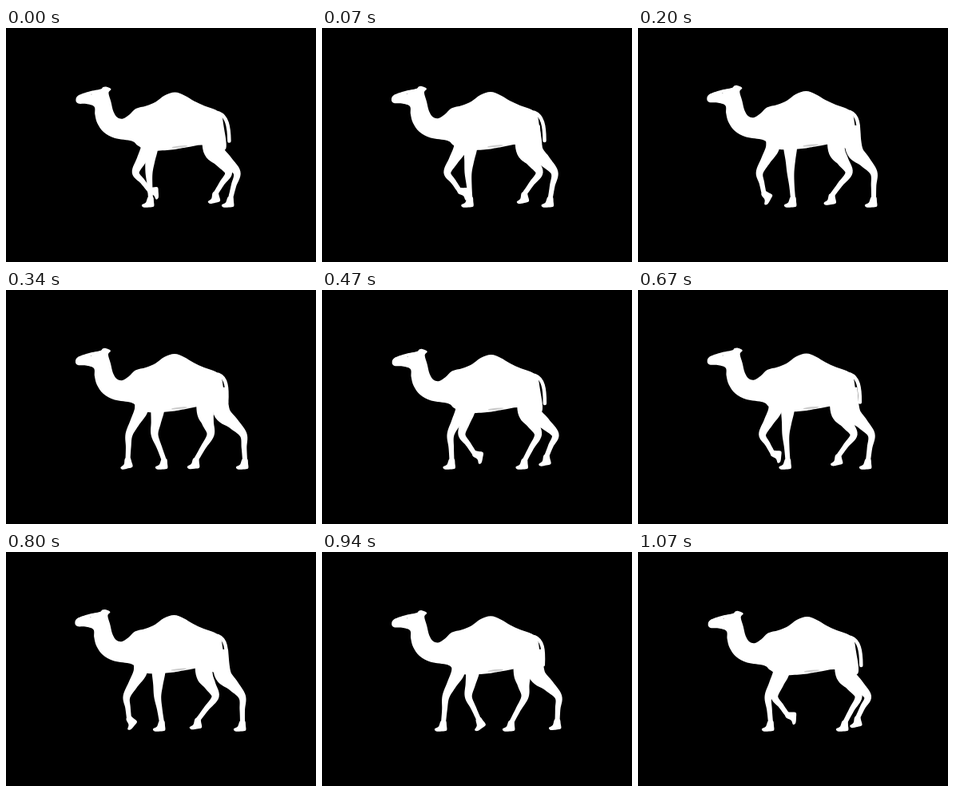
An HTML page with a canvas that plays this animation: 388x293 px, repeating every 1.14 s.

```html
<!DOCTYPE html>
<html lang="en">
<head>
<meta charset="utf-8">
<title>Walking camel</title>
<style>
  html, body { margin: 0; width: 100%; height: 100%; overflow: hidden; background: #000; }
  canvas { display: block; }
</style>
</head>
<body>
<canvas id="stage" width="388" height="293"></canvas>
<script>
const ctx = document.getElementById('stage').getContext('2d');
const LOOP = 1140, STEPS = 17, TURN = 2 * Math.PI;
const LIFT_OFF = 5, TOUCH_DOWN = 14, KNEE_Y = 181, GROUND = 213.5;

// Torso, neck and head, clockwise from the muzzle.
const TORSO = [
  [87, 90], [90, 84], [104, 79], [118, 76], [121, 73.5], [125, 73], [131, 76], [128, 81],
  [131, 92], [134, 104], [139, 111.5], [146, 113], [154, 108], [162, 100.5], [175, 97],
  [187, 92], [198, 84], [211, 80], [223, 84], [235, 91], [248, 97], [262, 102], [269, 108],
  [272, 122], [275, 150], [262, 152], [246, 146], [225, 149], [206, 152], [178, 153],
  [165, 147], [157, 141], [136, 137.5], [122, 130], [114, 119], [111, 108], [110, 98],
  [100, 94.5], [90, 94]
];
const FOOT = [[-3, -2], [3, -2], [4, 4], [4, 10], [-2, 11], [-9, 11], [-11, 8], [-6, 5]];

// Each gait serves both legs of a pair, half a loop apart.
// Its path holds phase, knee x and fetlock x.
const FRONT = {
  hip: 179.5, hipY: 150, lift: 10, tilt: 90, top: [136, 0, 8.5], widths: [8.5, 6.2, 4.5],
  path: [[0, 179, 181], [3, 191, 194], [5, 186, 198], [7, 175, 191],
         [9, 158, 176], [12, 151, 154], [14, 155, 152], [16, 163, 166]]
};
const HIND = {
  hip: 259.5, hipY: 152, lift: 6, tilt: 10, top: [122, -2, 9], widths: [10.5, 7.4, 4.6],
  path: [[0, 289, 281], [3, 295, 295], [5, 297, 299], [7, 292, 281],
         [9, 274, 256], [12, 262, 240], [14, 254, 237], [16, 276, 259]]
};

const lerp = (a, b, u) => a + (b - a) * u;

// Values of a looping path at a phase.
function sample(path, phase) {
  const i = path.findLastIndex(key => key[0] <= phase);
  const from = path[i], to = path[(i + 1) % path.length];
  const span = (to[0] - from[0] + STEPS) % STEPS;
  const u = (phase - from[0]) / span;
  return from.slice(1).map((v, k) => lerp(v, to[k + 1], u));
}

function fillSmooth(points) {
  const n = points.length, at = i => points[(i + n) % n];
  ctx.beginPath();
  ctx.moveTo(...at(0));
  for (let i = 0; i < n; i++) {
    const [a, b, c, d] = [at(i - 1), at(i), at(i + 1), at(i + 2)];
    ctx.bezierCurveTo(
      b[0] + (c[0] - a[0]) / 6, b[1] + (c[1] - a[1]) / 6,
      c[0] - (d[0] - b[0]) / 6, c[1] - (d[1] - b[1]) / 6, c[0], c[1]);
  }
  ctx.fill();
}

const spline = (a, b, c, d, u) => b + 0.5 * u * (c - a +
  u * (2 * a - 5 * b + 4 * c - d + u * (3 * (b - c) + d - a)));

// Tapered limb through joints given as [x, y, radius].
function fillLimb(joints) {
  const line = [], last = joints.length - 1;
  for (let i = 0; i < last; i++) {
    const set = [Math.max(i - 1, 0), i, i + 1, Math.min(i + 2, last)].map(k => joints[k]);
    for (let s = 0; s < 8; s++) {
      line.push([0, 1, 2].map(k => spline(...set.map(j => j[k]), s / 8)));
    }
  }
  line.push(joints[last]);
  const left = [], right = [];
  line.forEach(([x, y, r], i) => {
    const p = line[Math.max(i - 1, 0)], q = line[Math.min(i + 1, line.length - 1)];
    const len = Math.hypot(q[0] - p[0], q[1] - p[1]);
    const nx = -(q[1] - p[1]) / len * r, ny = (q[0] - p[0]) / len * r;
    left.push([x + nx, y + ny]);
    right.unshift([x - nx, y - ny]);
  });
  ctx.beginPath();
  [...left, ...right].forEach(p => ctx.lineTo(...p));
  ctx.fill();
}

function drawLeg(gait, phase) {
  const [kneeX, footX] = sample(gait.path, phase);
  const hipX = gait.hip + 11.5 * Math.cos(TURN * (phase - 3.7) / STEPS);
  const air = Math.min(1, Math.max(0, (phase - LIFT_OFF) / (TOUCH_DOWN - LIFT_OFF)));
  const swing = Math.sin(Math.PI * air ** 0.75);
  const footY = GROUND - gait.lift * swing;
  const [topY, topShift, topWidth] = gait.top;
  const [thigh, calf, knee] = gait.widths;
  fillLimb([
    [hipX + topShift, topY, topWidth],
    [hipX, gait.hipY, thigh],
    [lerp(hipX, kneeX, 0.52), lerp(gait.hipY, KNEE_Y, 0.5), calf],
    [kneeX, KNEE_Y, knee],
    [lerp(kneeX, footX, 0.5), lerp(KNEE_Y, footY, 0.5), 3.3],
    [footX, footY, 3]
  ]);
  ctx.save();
  ctx.translate(footX, footY);
  ctx.rotate(-gait.tilt * swing * Math.PI / 180);
  fillSmooth(FOOT);
  ctx.restore();
}

function drawBody(step) {
  const beat = 2 * TURN * step / STEPS;
  const bob = Math.sin(beat + 2.5), sway = 1.5 * Math.cos(beat) - 1;
  ctx.save();
  ctx.translate(bob * 0.7, bob);
  fillSmooth(TORSO);

  ctx.strokeStyle = '#fff';
  ctx.lineWidth = 4.5;
  ctx.lineCap = 'round';
  ctx.beginPath();
  ctx.moveTo(266, 106);
  ctx.bezierCurveTo(276, 110, 278.5 + sway / 2, 122, 278.5 + sway, 141);
  ctx.stroke();

  // Faint eye and belly shade.
  ctx.fillStyle = '#aaa';
  ctx.fillRect(106, 82, 1, 1);
  ctx.fillStyle = '#ccc';
  ctx.beginPath();
  ctx.ellipse(217, 148, 10, 1.2, -0.1, 0, TURN);
  ctx.fill();
  ctx.restore();
}

function draw(step) {
  ctx.fillStyle = '#000';
  ctx.fillRect(0, 0, 388, 293);
  ctx.fillStyle = '#fff';
  for (const gait of [FRONT, HIND]) {
    drawLeg(gait, step);
    drawLeg(gait, (step + STEPS / 2) % STEPS);
  }
  drawBody(step);
}

// Step times fall on whole hundredths of a second.
const startOf = step => Math.round(step * LOOP / STEPS / 10) * 10;

const begin = performance.now();
function tick() {
  const t = (performance.now() - begin) % LOOP;
  let step = STEPS - 1;
  while (startOf(step) > t) step--;
  draw(step);
  requestAnimationFrame(tick);
}
tick();
</script>
</body>
</html>
```
